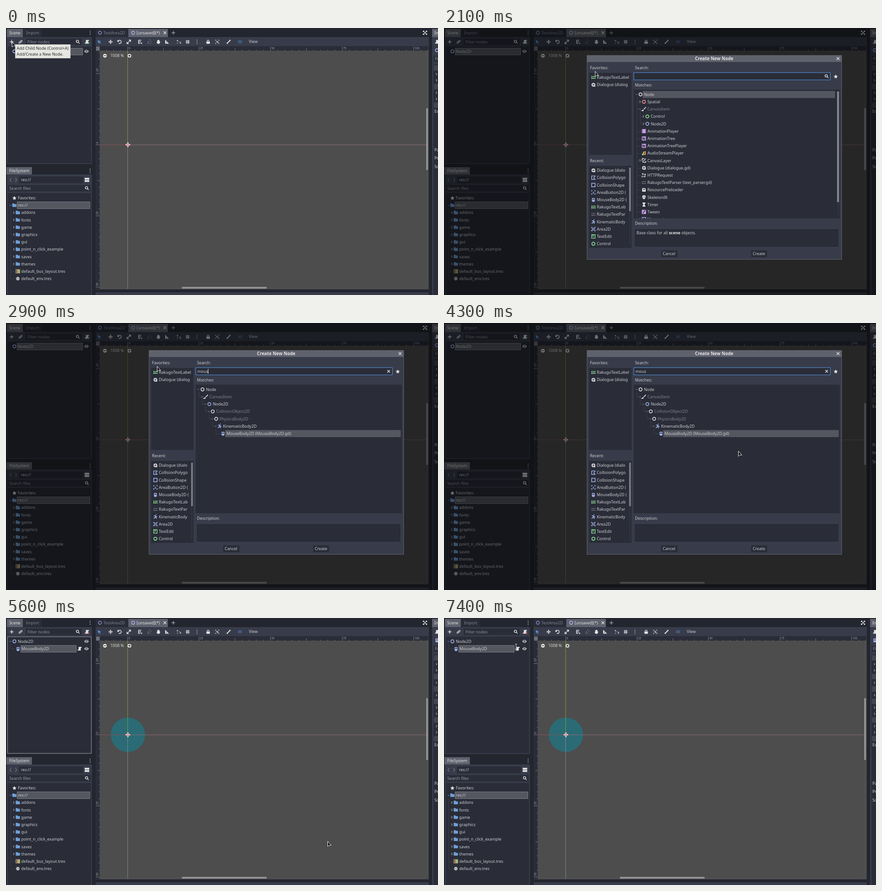
Animation of 950x589 px, one loop 7500 ms. Source, as an HTML page with a canvas:

```html
<!DOCTYPE html>
<html lang="en">
<head>
<meta charset="utf-8">
<title>Create New Node</title>
<style>
html, body { margin: 0; width: 100%; height: 100%; overflow: hidden; background: #23262e; }
canvas { display: block; }
</style>
</head>
<body>
<canvas id="stage" width="950" height="589"></canvas>
<script>
const ctx = document.getElementById('stage').getContext('2d');
const LOOP = 7500, OPEN = 600, PRESS = 5500, CREATED = 5600, ROW = 16.2;
const BASE = '#383c4a', DARK = '#2a2d38', WINDOW = '#23262e', TAB = '#5f626d', SELECTED = '#555760';
const TEXT = '#cdced2', FADED = '#7f828b', WHITE = '#e6e6e6', ACCENT = '#5294e2';
const BLUE = '#a5b7f3', GREEN = '#8eef97', RED = '#fc9c9c', PURPLE = '#cea4f1', FOLDER = '#709fd6';

function gradient(...colors) {
  const g = ctx.createLinearGradient(-4, 0, 4, 0);
  colors.forEach((c, i) => g.addColorStop(i / (colors.length - 1), c));
  return g;
}

// name: [path centred on 0,0, colour, line width (0 fills)]
const RING = 'M3.4 0A3.4 3.4 0 1 1-3.4 0A3.4 3.4 0 1 1 3.4 0Z';
const ICONS = {
  ring: [RING, WHITE, 1.5],
  red: [RING, RED, 1.5],
  green: [RING, GREEN, 1.5],
  blue: [RING, BLUE, 1.5],
  plus: ['M-4 0H4M0-4V4', WHITE, 1.5],
  close: ['M-3-3L3 3M3-3L-3 3', WHITE, 1.3],
  attach: ['M-2 0H2M0-2V2', GREEN, 1.4],
  detach: ['M-1.6-1.6L1.6 1.6M1.6-1.6L-1.6 1.6', '#ff7a7a', 1.3],
  lens: ['M1.7-1A2.6 2.6 0 1 1-3.5-1A2.6 2.6 0 1 1 1.7-1M.9.9L3.8 3.8', WHITE, 1.4],
  dots: ['M-.8-4.6H.8V-3H-.8ZM-.8-.8H.8V.8H-.8ZM-.8 3H.8V4.6H-.8Z', TEXT, 0],
  closed: ['M-1.2-2.4L1.2 0L-1.2 2.4', '#a0a2a9', 1.1],
  open: ['M-2.2-1L0 1.1L2.2-1', '#8a8d95', 1],
  back: ['M1.5-4L-1.5 0L1.5 4', FADED, 1.2],
  next: ['M-1.5-4L1.5 0L-1.5 4', FADED, 1.2],
  eye: ['M-4.8 0Q0-7 4.8 0Q0 7-4.8 0ZM2.4 0A2.4 2.4 0 1 0-2.4 0A2.4 2.4 0 1 0 2.4 0ZM1.1 0A1.1 1.1 0 1 0-1.1 0A1.1 1.1 0 1 0 1.1 0Z', WHITE, 0],
  link: ['M-.4-1.2L1.4-3Q4-4 3.3-1.2L1.4.7Q.4 1.2-.4.6M.4 1.2L-1.4 3Q-4 4-3.3 1.2L-1.4-.7Q-.4-1.2.4-.6', WHITE, 1.2],
  script: ['M-2.4-4H4.2V-1.6H2.4V4H-4.4V1.8H-2.4Z', WHITE, 0],
  folder: ['M-4.6-4H-.8L.2-2.6H4.6V3.8H-4.6Z', FOLDER, 0],
  star: ['M0-4.6L1.3-1.5L4.6-1.2L2.1 1L2.8 4.2L0 2.5L-2.8 4.2L-2.1 1L-4.6-1.2L-1.3-1.5Z', WHITE, 0],
  split: ['M-5-4.5H5V-.6H-5ZM-5 .6H5V4.5H-5Z', WHITE, 0],
  globe: [RING + 'M-3.4 0H3.4M0-3.4V3.4M-2.6-1.8H2.6M-2.6 1.8H2.6', WHITE, 1],
  bus: ['M-4.5-4.5H-1.8V4.5H-4.5ZM-3.7-3.7V3.7H-2.6V-3.7ZM-1-4.5H1.6V4.5H-1ZM2.4-4.5H4.8V4.5H2.4Z', gradient('#e8e8e8', '#ff7a6b', '#ffe36b', '#7be08a'), 0],
  film: ['M-4.5-4.5H4.5V4.5H-4.5ZM-3.7-3.4V-2H-2.6V-3.4ZM-3.7 2V3.4H-2.6V2ZM2.6-3.4V-2H3.7V-3.4ZM2.6 2V3.4H3.7V2ZM-3.7-.7V.7H-2.6V-.7ZM2.6-.7V.7H3.7V-.7Z', PURPLE, 0],
  graph: ['M-4.5-4.5H4.5V4.5H-4.5ZM-3-3V3H-1.5V1H0V3H3V1.6H1V0H3V-2H1V-1H-1.5V-3Z', PURPLE, 0],
  note: ['M-2-2.5L4-4.3V2.2A1.8 1.6 0 1 1 2.4.6V-2L-.5-1.2V3A1.9 1.7 0 1 1-2 1.2Z', gradient('#8eef97', '#ffe36b', '#ff7a6b'), 0],
  brush: ['M4.4-4.4L-.6.6M-1.8 1.2Q-2.5 3-4 3.6Q-2 4-1 2.2', WHITE, 1.7],
  layer: ['M-4 1V-4H1M4 1V4H-2M4-4L-1.5 1.5M-2 2L-3.6 3.6', WHITE, 1.4],
  talk: ['M4 0A4 4 0 1 0 0 4H4V0ZM2 0A2 2 0 1 1-2 0A2 2 0 1 1 2 0ZM.8 0A.8.8 0 1 0-.8 0A.8.8 0 1 0 .8 0Z', WHITE, 0],
  http: ['M-2.4 0V-4M-4.2-2.4L-2.4-4.2L-.6-2.4M2.4-4V0M.6-1.8L2.4 0L4.2-1.8M-4.5 2V4.5M-3 2V4.5M-1 2.4H1M0 2V4.5M2 4.5V2.4H4', WHITE, 1.1],
  words: ['M-4.5-3H-2.5V-1H-4.5ZM-1.4-3H.6V-1H-1.4ZM1.8-3H4.5V-1H1.8ZM-4.5.6H-2V3H-4.5ZM-1 .6H1.4V3H-1ZM2.5.6H4.5V3H2.5Z', GREEN, 0],
  parser: ['M-4-3H-2.5V-1H-4ZM-1-3H1V-1H-1ZM2.4-3H4V-1H2.4ZM-4 1H-2V3H-4ZM-.8 1H1V3H-.8ZM2.4 1H4V3H2.4Z', '#85878e', 0],
  preload: ['M-3.8-3.8H2L3.8-2V3.8H-3.8ZM-1.5-2V.3H1.5V-2Z', WHITE, 0],
  bone: ['M-3 3L3-3M-4.2 2.4L-2.2 4.2M2.2-4.2L4.2-2.4', WHITE, 1.9],
  skeleton: ['M-3.8 1V-1.2A3.8 3.2 0 0 1 3.8-1.2V1L2.2 1.8V4H-2.2V1.8ZM-2.4-1.4V.4H-.8V-1.4ZM.8-1.4V.4H2.4V-1.4Z', WHITE, 0],
  timer: ['M-3.2-4.5H3.2V-3L1 0L3.2 3V4.5H-3.2V3L-1 0L-3.2-3Z', WHITE, 0],
  tween: ['M-4.5-4.5H4.5V4.5H-4.5ZM-3 3H-.6V.6H1.4V-1.5H3.3V-3H0V-.6H-1.6V1.6H-3Z', PURPLE, 0],
  polygon: ['M-3.8-3.8H3.8L.8 0L3.8 3.8H-3.8Z', BLUE, 1.4],
  shape: ['M-3.8-3.8H3.8V3.8H-3.8Z', BLUE, 1.5],
  button: ['M-4-2V-4H-2M2-4H4V-2M4 2V4H2M-2 4H-4V2M0-1.5V1M-1.6 1.8H1.6', BLUE, 1.3],
  area: ['M-4-2V-4H-2M2-4H4V-2M4 2V4H2M-2 4H-4V2M-2-2H2V2H-2Z', BLUE, 1.3],
  mouse: ['M-3.4-.6A3.4 3.8 0 0 1-.6-4.4V-.6ZM.6-4.4A3.4 3.8 0 0 1 3.4-.6H.6ZM-3.4.5H3.4V1.4A3.4 3.4 0 0 1-3.4 1.4Z', BLUE, 0],
  runner: ['M.6-4.4H2.6M-3.4-2.2H.4L2 .2H4.2M.4-2L-.8 1L2 2.2V4.4M-.8 1L-1.8 3H-4.2', BLUE, 1.5],
  edit: ['M-3.8-3.8H3.8V3.8H-3.8ZM-1.6-1.8H.4M-.6-1.8V1', GREEN, 1.3],
  select: ['M-3.5-4L4-.5L.8.4L3.6 3.4L2.4 4.4L-.4 1.4L-1.6 4Z', ACCENT, 0],
  move: ['M0-4.8L2-2.6H.7V-.7H2.6V-2L4.8 0L2.6 2V.7H.7V2.6H2L0 4.8L-2 2.6H-.7V.7H-2.6V2L-4.8 0L-2.6-2V-.7H-.7V-2.6H-2Z', WHITE, 0],
  rotate: ['M-3.6-1A3.6 3.6 0 1 1-2 3.1M-4.2-3.8V-.8H-1.2', WHITE, 1.5],
  scale: ['M-3.5 3.5L3.5-3.5M0-4H4V0M-4 0V4H0', WHITE, 1.4],
  list: ['M-4-3.5H2.5M-4 0H2M-4 3.5H0M-3.5-4V4M1.5 2.2L3 4L4.5 2.2', WHITE, 1.4],
  pivot: ['M-3.8 3.8L-1 1M0-4H2M3.8-2V0M-2-1.5V.5M1 3.5H3', FADED, 1.4],
  hand: ['M-2.6.8V-3H-1.4V-.6V-4.2H0V-.6V-4.5H1.3V-.4V-3.6H2.5V-.2L3.8-1.6V1.4Q3 4.5 0 4.5Q-2.4 4.3-4.2.4Z', WHITE, 0],
  angle: ['M-4-4.5L4.5 4H-4ZM-2-.4V2H.4Z', WHITE, 0],
  snap: ['M-3-4V-1M-4.5-2.5H-1.5M-3 2V4M0 0H2M4 0V4M2 3H4.5', WHITE, 1.2],
  grid: ['M-1.7-4.2V4.2M1.8-4.2V4.2M-4.2-1.7H4.2M-4.2 1.8H4.2', WHITE, 1.2],
  lock: ['M-2.6-.6V-2A2.6 2.6 0 0 1 2.6-2V-.6H3.8V4.2H-3.8V-.6ZM-1.3-.6H1.3V-2A1.3 1.3 0 0 0-1.3-2Z', WHITE, 0],
  group: ['M-4-2V-4H-2M2-4H4V-2M4 2V4H2M-2 4H-4V2M-1.5-1.5H.5V.5H-1.5ZM0 0H2V2H0Z', TEXT, 1],
  camera: ['M-2-3.4H4.4V3H-2L-4.4 1.8V-2Z', '#42597f', 0],
  full: ['M-4-1.4V-4H-1.4M1.4-4H4V-1.4M4 1.4V4H1.4M-1.4 4H-4V1.4M-3.6-3.6L3.6 3.6M3.6-3.6L-3.6 3.6', WHITE, 1.2],
  cross: ['M0-5V5M-5 0H5', WHITE, 3.2],
  crossFill: ['M0-4V4M-4 0H4', '#f77f83', 1.5],
  disc: ['M4 0A4 4 0 1 1-4 0A4 4 0 1 1 4 0Z', '#f0f0f0', 0],
  arrow: ['M.5.5V12.2L3.2 9.4H8Z', '#101010', 0],
  arrowEdge: ['M.5.5V12.2L3.2 9.4H8Z', '#f0f0f0', 1],
  ibeam: ['M-2.5-5.5H-.5L0-5L.5-5.5H2.5M0-5V5M-2.5 5.5H-.5L0 5L.5 5.5H2.5', '#dcdcdc', 1]
};
for (const def of Object.values(ICONS)) def[0] = new Path2D(def[0]);

function icon(name, x, y, color) {
  const [path, tint, width] = ICONS[name];
  ctx.save();
  ctx.translate(x, y);
  ctx.fillStyle = ctx.strokeStyle = color || tint;
  ctx.lineWidth = width;
  if (width) ctx.stroke(path); else ctx.fill(path, 'evenodd');
  ctx.restore();
}
function rect(x1, y1, x2, y2, color) {
  ctx.fillStyle = color;
  ctx.fillRect(x1, y1, x2 - x1, y2 - y1);
}
function frame(x1, y1, x2, y2, color) {
  ctx.strokeStyle = color;
  ctx.lineWidth = 1;
  ctx.strokeRect(x1 + .5, y1 + .5, x2 - x1 - 1, y2 - y1 - 1);
}
function text(s, x, y, color = TEXT, size = 8.9, weight = 400) {
  ctx.font = `${weight} ${size}px "Noto Sans", sans-serif`;
  ctx.fillStyle = color;
  ctx.fillText(s, x, y + 3.2);
  return x + ctx.measureText(s).width;
}
function field(x1, y1, x2, y2, edge = '#30343f') {
  rect(x1, y1, x2, y2, DARK);
  frame(x1, y1, x2, y2, edge);
}
function selection(x1, y, x2, edge) {
  rect(x1, y - 7.5, x2, y + 8, SELECTED);
  if (edge) frame(x1, y - 7.5, x2, y + 8.5, '#7b7d85');
}

function sceneDock(t) {
  const created = t >= CREATED;
  rect(2, 20, 189, 300, BASE);
  rect(2, 2, 37, 20, TAB);
  rect(37, 2, 79, 20, DARK);
  text('Scene', 7, 10.5, WHITE);
  text('Import', 44, 10.5, FADED);
  icon('dots', 185, 10.5);
  icon('plus', 12.5, 30.5, t >= OPEN && t < 1000 ? FADED : WHITE);
  icon('link', 32, 30.5);
  field(43, 23, 167, 38);
  text('Filter nodes', 47, 30.5, '#8f929a');
  icon('lens', 158, 30.5);
  icon('script', 178, 30.5);
  icon(created ? 'detach' : 'attach', 181, 33);
  rect(4, 41, 187, 298, DARK);
  if (created && t < 5700) frame(3, 41, 188, 299, '#8d9097');
  if (!created) selection(24, 51.5, 169, true);
  icon('blue', 18.5, 51.5);
  text('Node2D', 26, 51.5);
  icon('eye', 177, 51.5);
  if (!created) return;
  icon('open', 10, 51.5);
  rect(10, 57, 11, 68, '#3b3e48');
  rect(10, 67, 20, 68, '#3b3e48');
  selection(32, 67.5, 155, true);
  icon('mouse', 26.5, 68);
  text('MouseBody2D', 34, 67.7);
  icon('script', 162, 67.7);
  icon('eye', 177, 67.7);
}

const FOLDERS = ['addons', 'fonts', 'game', 'graphics', 'gui', 'point_n_click_example', 'saves', 'themes'];
function fileDock() {
  rect(2, 323, 189, 589, BASE);
  rect(1, 307, 57, 323, TAB);
  text('FileSystem', 7, 315, WHITE);
  icon('dots', 185, 315);
  icon('back', 10, 335);
  icon('next', 22, 335);
  field(28, 327, 170, 343);
  text('res://', 33, 335);
  icon('split', 178, 335);
  field(4, 346, 187, 361);
  text('Search files', 7, 353.5, '#9b9da5');
  icon('lens', 178, 353.5);
  rect(4, 364, 187, 589, DARK);
  icon('star', 18.5, 375);
  text('Favorites:', 26, 374.7);
  selection(24, 390.5, 185, true);
  icon('open', 10, 391);
  icon('folder', 18.5, 391);
  text('res://', 26, 390.9);
  rect(10, 398, 11, 553, '#3b3e48');
  FOLDERS.forEach((name, i) => {
    const y = 407.1 + i * ROW;
    icon('closed', 17, y);
    icon('folder', 26, y);
    text(name, 33.5, y);
  });
  ['default_bus_layout.tres', 'default_env.tres'].forEach((name, i) => {
    const y = 536.7 + i * ROW;
    rect(10, Math.round(y), 20, Math.round(y) + 1, '#3b3e48');
    icon(i ? 'globe' : 'bus', 26, y);
    text(name, 33.5, y);
  });
}

function ruler(origin, from, to, tick) {
  const step = 15.72;
  for (let i = Math.ceil((from - origin) / step); origin + i * step < to; i++)
    tick(Math.round(origin + i * step), i % 10 ? (i % 5 ? 2 : 5) : 9, i % 10 ? '' : String(i * 2.5));
}

const TOOLS = { select: 205, move: 230, rotate: 250, scale: 270, list: 295, pivot: 315, hand: 335, angle: 354,
  snap: 380, grid: 399.5, dots: 420, lock: 444.5, group: 464.5, bone: 489.5, camera: 514.5 };
function editor(t) {
  rect(197, 20, 930, 577, BASE);
  rect(197, 2, 269, 20, DARK);
  rect(269, 2, 356, 20, TAB);
  icon('blue', 206.5, 10.5, '#7f8cc0');
  text('TestArea2D', 214, 10.5, FADED);
  icon('blue', 279.5, 10.5);
  text('[unsaved](*)', 287, 10.5, WHITE);
  icon('close', 349.5, 10.5);
  icon('plus', 368, 10.5, '#9a9ca4');
  icon('full', 921.5, 10.5);
  for (const name in TOOLS) icon(name, TOOLS[name], 30.5);
  text('View', 534, 30.2);

  rect(197, 40, 929, 576, DARK);
  rect(206, 50, 929, 576, '#4d4d4d');
  rect(198, 41, 206, 50, '#6b6f78');
  const mark = '#777a82';
  ruler(267, 207, 929, (x, size, label) => {
    rect(x, 50 - size, x + 1, 50, mark);
    text(label, x + 2.5, 43.7, '#a0a2a8', 6.2);
  });
  ruler(257, 51, 576, (y, size, label) => {
    rect(206 - size, y, 206, y + 1, mark);
    ctx.save();
    ctx.translate(200, y - 2);
    ctx.rotate(-Math.PI / 2);
    text(label, 0, 0, '#a0a2a8', 6.2);
    ctx.restore();
  });
  if (t >= CREATED) {
    ctx.fillStyle = '#2b6b75';
    ctx.beginPath();
    ctx.arc(268, 257.5, 37.8, 0, 7);
    ctx.fill();
  }
  rect(206, 257.3, 267, 258.3, '#86525a');
  rect(268, 257.3, 929, 258.3, '#8b6a7c');
  rect(267, 50, 268, 257, '#78a03a');
  rect(267, 258, 268, 576, '#7d8a80');
  icon('cross', 268, 257.5);
  icon('crossFill', 268, 257.5);
  rect(207, 573, 919, 574, '#565656');
  rect(925, 51, 926, 566, '#565656');
  rect(387, 571, 573, 575, '#929292');
  rect(924, 177, 928, 313, '#929292');
  for (const [x, sign] of [[217.5, 0], [271.5, 1]]) {
    icon('disc', x, 61.2);
    rect(x - 2.5, 60.5, x + 2.5, 62, '#333');
    if (sign) rect(x - .7, 58.7, x + .7, 63.7, '#333');
  }
  text('1008 %', 229.5, 61, '#dcdcdc');
  rect(197, 583, 930, 589, BASE);
}

function inspector(t) {
  const created = t >= CREATED;
  rect(937, 20, 950, 589, BASE);
  rect(937, 2, 950, 20, TAB);
  text('In', 942, 10.5, WHITE);
  icon('script', 948, 30.5);
  icon(created ? 'mouse' : 'blue', 947.5, 49);
  field(940, 61, 952, 75);
  text('Fi', 943, 68, '#8f929a');
  rect(940, 80, 950, 589, DARK);
  // b = category band, > = closed section
  [...(created ? 'b>>b>b>b>>b>>b' : 'b>>b>>b')].forEach((kind, i) => {
    const y = 88 + i * 13.7;
    if (kind === 'b') rect(941, y - 6, 950, y + 6, '#42454f');
    else icon('closed', 946.5, y);
  });
  const shift = created ? 96 : 0;
  [['Ec', 184], ['Pa', 268.5], ['Pr', 287], ['Sc', 306]].forEach(([s, y]) => text(s, 942, y + shift));
}

// rows: [depth, icon, label, flags], flags: > closed, v open, - abstract class
const CLASSES = [[0, 'ring', 'Node', 'v'], [1, 'red', 'Spatial', '>'], [1, 'brush', 'CanvasItem', 'v-'],
  [2, 'green', 'Control', '>'], [2, 'blue', 'Node2D', '>'], [1, 'film', 'AnimationPlayer', ''],
  [1, 'graph', 'AnimationTree', ''], [1, 'graph', 'AnimationTreePlayer', ''], [1, 'note', 'AudioStreamPlayer', ''],
  [1, 'layer', 'CanvasLayer', '>'], [1, 'talk', 'Dialogue (dialogue.gd)', ''], [1, 'http', 'HTTPRequest', ''],
  [1, 'parser', 'RakugoTextParser (text_parser.gd)', ''], [1, 'preload', 'ResourcePreloader', ''],
  [1, 'skeleton', 'SkeletonIK', ''], [1, 'timer', 'Timer', ''], [1, 'tween', 'Tween', ''], [1, 'shape', 'Viewport', '>']];
const MOUSE = [[0, 'ring', 'Node', 'v'], [1, 'brush', 'CanvasItem', 'v-'], [2, 'blue', 'Node2D', 'v'],
  [3, 'ring', 'CollisionObject2D', 'v-'], [4, 'ring', 'PhysicsBody2D', 'v-'], [5, 'runner', 'KinematicBody2D', 'v'],
  [6, 'mouse', 'MouseBody2D (MouseBody2D.gd)', '']];
const VISUAL = [[1, 'red', 'Spatial', 'v'], [2, 'red', 'VisualInstance', 'v-'], [3, 'red', 'GeometryInstance', 'v-']];
const MESHES = ['ImmediateGeometry', 'MeshInstance', 'MultiMeshInstance'].map(s => [4, 'red', s, '']);
const CAMERAS = ['Camera', 'RemoteTransform'].map(s => [2, 'red', s, '']);
const M_ROWS = [MOUSE[0], ...VISUAL, ...MESHES, ...CAMERAS, ...MOUSE.slice(1), ...CLASSES.slice(5, 9)];
const MOU_ROWS = [MOUSE[0], ...VISUAL, ...MOUSE.slice(1)];

function matches(rows, selected, right) {
  ctx.save();
  ctx.beginPath();
  ctx.rect(418, 137, 452, 283);
  ctx.clip();
  const lastY = [];
  rows.forEach(([depth, glyph, label, flags], i) => {
    const y = 146.5 + i * ROW, x = 424 + depth * 7.5;
    if (depth) {
      const line = Math.round(y), px = Math.round(x - 8);
      rect(px, lastY[depth - 1] + 5, px + 1, line, '#3f424c');
      rect(px, line, px + (flags ? 5 : 13), line + 1, '#3f424c');
    }
    lastY[depth] = Math.round(y);
    if (i === selected) selection(x + 13, y, right);
    if (flags) icon(flags[0] === '>' ? 'closed' : 'open', x - .5, y);
    icon(glyph, x + 8.2, y);
    text(label, x + 15.7, y, flags.includes('-') ? FADED : TEXT);
  });
  ctx.restore();
}

const FAVORITES = [['words', 'RakugoTextLabel'], ['talk', 'Dialogue (dialog']];
const RECENT = [['talk', 'Dialogue (dialo'], ['polygon', 'CollisionPolygo'], ['shape', 'CollisionShape'],
  ['button', 'AreaButton2D ('], ['mouse', 'MouseBody2D ('], ['words', 'RakugoTextLab'], ['parser', 'RakugoTextPar'],
  ['runner', 'KinematicBody'], ['area', 'Area2D'], ['edit', 'TextEdit'], ['green', 'Control']];
function shortcuts(title, titleY, items, top) {
  text(title, 321, titleY);
  rect(319, top, 412.5, top + 181, DARK);
  items.forEach(([glyph, label], i) => {
    const y = top + 10 + i * ROW;
    icon(glyph, 328.5, y);
    text(label, 336, y);
  });
}

function dialog(t) {
  rect(0, 0, 950, 589, 'rgba(0,0,0,.5)');
  rect(314, 60, 875, 511, BASE);
  frame(314, 60, 875, 511, TAB);
  rect(314, 60, 875, 75, TAB);
  text('Create New Node', 552, 68, WHITE, 9.7, 600);
  icon('close', 866.5, 67.5);
  shortcuts('Favorites:', 88, FAVORITES, 99);
  shortcuts('Recent:', 293, RECENT, 304);
  rect(408, 308, 409, 477, '#3a3d48');
  rect(407, 308, 411, 404, '#777a82');

  const typed = t < 2300 ? '' : t < 2700 ? 'm' : t < 2900 ? 'mou' : 'mous';
  const pressed = t >= PRESS;
  text('Search:', 420, 88);
  field(417, 98, 850, 115, pressed ? '#30343f' : ACCENT);
  const caretX = text(typed, 421, 106.5);
  const caret = typed ? t < 2800 || (t - 2800) % 1000 < 500 : (t - OPEN) % 1000 < 500;
  if (caret && !pressed) rect(Math.round(caretX), 101, Math.round(caretX) + 1, 112, WHITE);
  icon(typed ? 'close' : 'lens', 841.5, 106.5);
  icon('star', 861.5, 107);

  text('Matches:', 420, 125.5);
  rect(417, 136, 870.5, 420, DARK);
  if (typed.length < 2) {
    matches(typed ? M_ROWS : CLASSES, typed ? 5 : 0, 860);
    rect(866, 140, 867, 412, '#3a3d48');
    rect(864.5, 140, 868.5, typed ? 300 : 384, '#8a8c94');
  } else {
    const rows = typed === 'mou' ? MOU_ROWS : MOUSE;
    matches(rows, rows.length - 1, 868);
  }

  text('Description:', 420, 431);
  field(420, 444, 867, 482, '#22252d');
  if (!typed) {
    let x = text('Base class for all ', 423.5, 452);
    x = text('scene', x, 452, WHITE, 8.9, 600);
    text(' objects.', x, 452);
  } else if (typed === 'm') {
    text('Node that instances meshes into a scenario.', 423.5, 452);
  }
  field(477, 490, 514, 506);
  text('Cancel', 481, 498);
  field(675, 490, 711, 506, pressed ? ACCENT : '#30343f');
  text('Create', 679, 498, pressed ? ACCENT : TEXT);
}

function tooltip() {
  rect(20, 36, 142, 67, '#e6e6e2');
  frame(20, 36, 142, 67, '#b8b8b4');
  text('Add Child Node (Control+A)', 23.5, 45, '#2b2b2b');
  text('Add/Create a New Node.', 23.5, 58, '#2b2b2b');
}

// pointer stops: [ms, x, y]
const POINTER = [[0, 13, 30], [900, 13, 30], [1000, 210, 72], [1100, 332, 95], [3400, 332, 95], [3800, 455, 160],
  [4200, 606, 253], [4600, 770, 370], [4800, 815, 430], [5000, 790, 474], [5400, 707, 492], [6000, 707, 492],
  [6300, 432, 367], [6400, 432, 367], [6700, 220, 170], [6900, 64, 20], [7000, 62, -20], [LOOP, 62, -20]];
function pointer(t) {
  if (t >= 7400) return icon('ibeam', 158.5, 63);
  const i = POINTER.findIndex(stop => stop[0] > t);
  const [t0, x0, y0] = POINTER[i - 1], [t1, x1, y1] = POINTER[i];
  const k = (t - t0) / (t1 - t0);
  const x = Math.round(x0 + (x1 - x0) * k), y = Math.round(y0 + (y1 - y0) * k);
  icon('arrow', x, y);
  icon('arrowEdge', x, y);
}

function draw(now) {
  const t = Math.floor(now % LOOP / 100) * 100;
  rect(0, 0, 950, 589, WINDOW);
  sceneDock(t);
  fileDock();
  editor(t);
  inspector(t);
  if (t < OPEN) tooltip();
  else if (t < CREATED) dialog(t);
  pointer(t);
}

let start;
function tick(now) {
  start ??= now;
  draw(now - start);
  requestAnimationFrame(tick);
}
requestAnimationFrame(tick);
</script>
</body>
</html>
```
